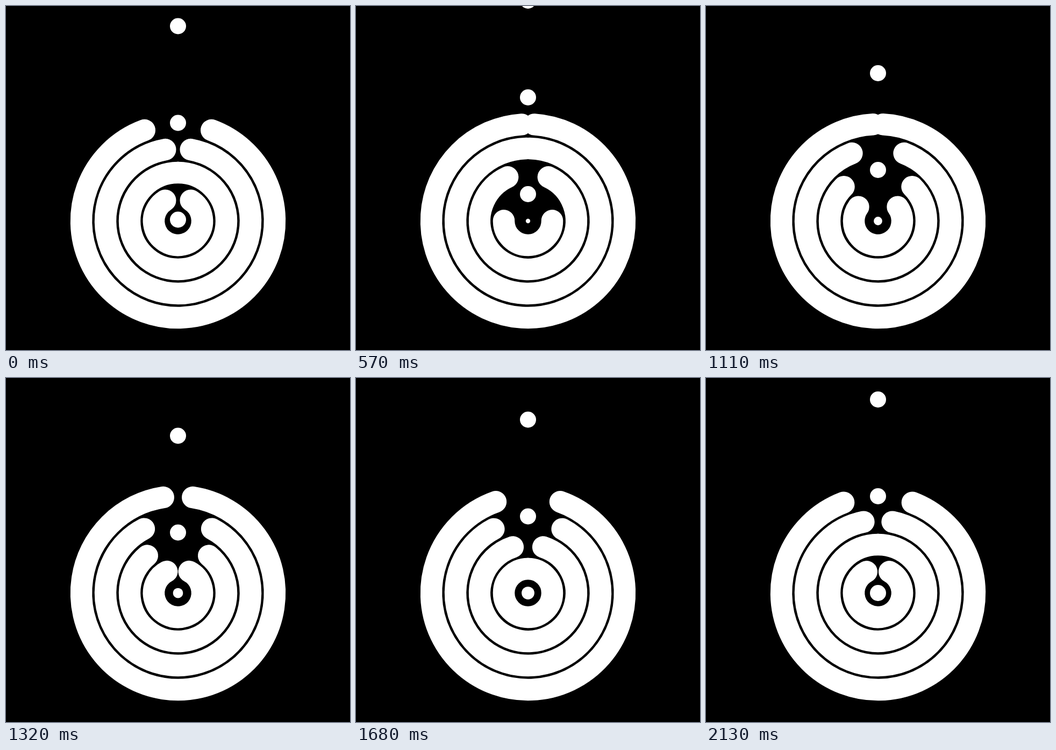
Animation, 640 px wide and 640 px high, one loop 2.16 s. Source, as an HTML page with a canvas:

```html
<!DOCTYPE html>
<html lang="en">
<head>
<meta charset="utf-8">
<title>Opening rings</title>
<style>
  html, body { margin: 0; width: 100%; height: 100%; overflow: hidden; background: #000; }
  canvas { display: block; width: 640px; height: 640px; }
</style>
</head>
<body>
<canvas id="stage" width="640" height="640"></canvas>
<script>
  const ctx = document.getElementById('stage').getContext('2d');
  const LOOP = 2160, STEP = 30;
  const CX = 320, CY = 400;
  const TRAVEL = 180;      // distance a dot rises per loop
  const RING_GAP = 45, RINGS = 4;
  const DOT_R = 15;
  const TAU = Math.PI * 2;

  function dot(y, r) {
    ctx.beginPath();
    ctx.arc(CX, y, r, 0, TAU);
    ctx.fill();
  }

  // Ring k swings open by up to 90/k degrees on each side of the top.
  function ring(k, rise) {
    const phase = TAU * (rise - 20 - 36 * k) / TRAVEL;
    const half = Math.PI / (2 * k) * (1 + Math.cos(phase)) / 2;
    const top = -Math.PI / 2;
    ctx.beginPath();
    ctx.arc(CX, CY, RING_GAP * k, top + half, top + TAU - half);
    ctx.stroke();
  }

  function draw(ms) {
    const held = Math.floor((ms % LOOP) / STEP) * STEP;
    const p = ((held + STEP) % LOOP) / LOOP;
    const rise = p * TRAVEL;

    ctx.fillStyle = '#000';
    ctx.fillRect(0, 0, 640, 640);
    ctx.fillStyle = ctx.strokeStyle = '#fff';
    ctx.lineWidth = 40.5;
    ctx.lineCap = 'round';

    for (let k = 1; k <= RINGS; k++) ring(k, rise);
    for (let i = 0; i < 3; i++) dot(CY - rise - i * TRAVEL, DOT_R);
    dot(CY, DOT_R * p);
  }

  const start = performance.now();
  function tick() {
    draw(performance.now() - start);
    requestAnimationFrame(tick);
  }
  tick();
</script>
</body>
</html>
```
